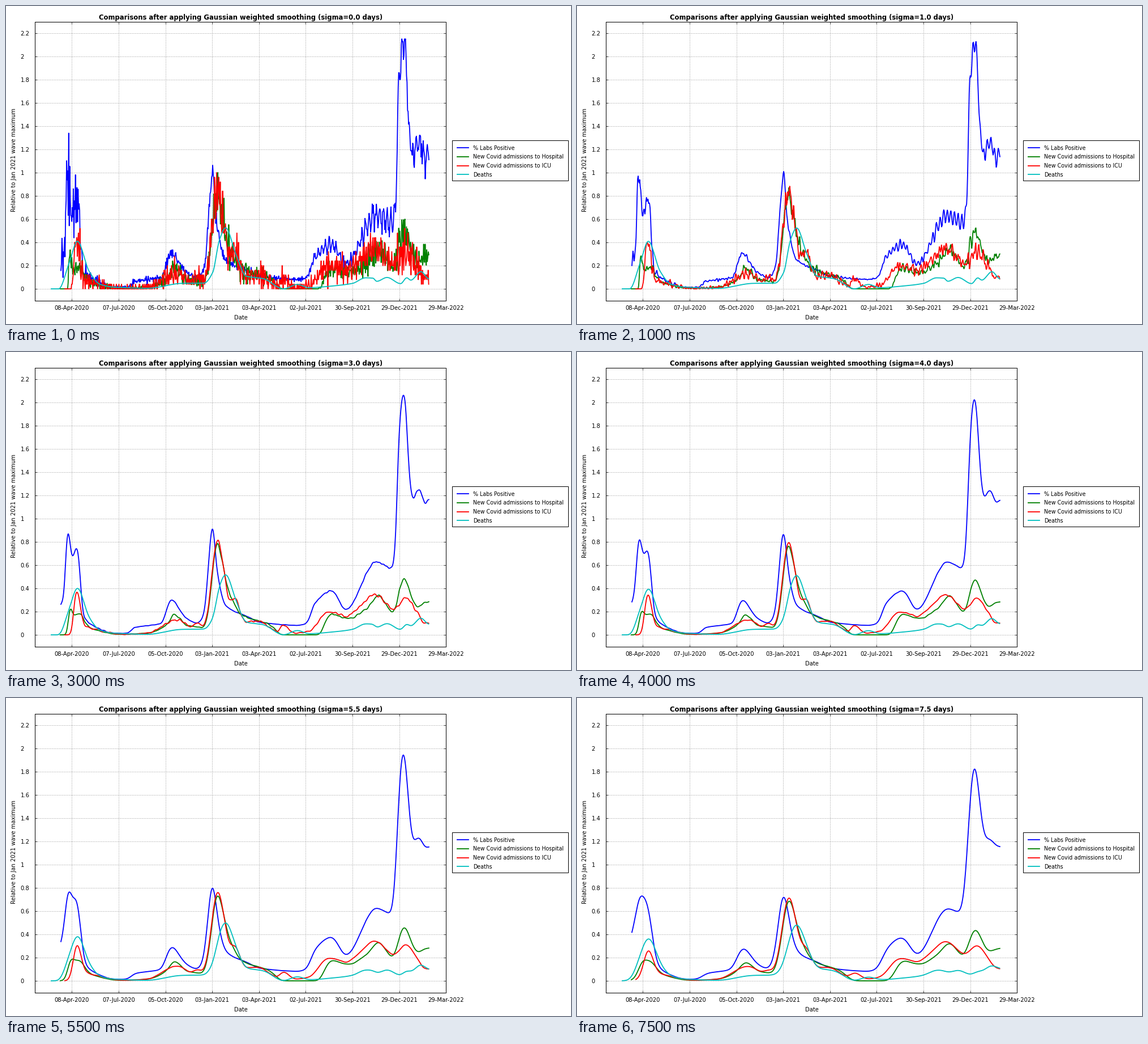
Animation of 998x561 px, one loop 8000 ms. Source, as a matplotlib script:

```python
import numpy as np
import matplotlib.pyplot as plt
from matplotlib.animation import FuncAnimation
from matplotlib.patches import Rectangle

plt.rcParams["font.family"] = "DejaVu Sans"

W, H, DPI = 998, 561, 72  # at 72 dpi one point is one pixel
LEFT, RIGHT, TOP, BOTTOM = 51, 777, 28, 520
ZERO, UNIT = 499, 205.1  # y of value 0, pixels per 1.0
APRIL, DAY = 116.3, 0.918  # x of 8 April 2020, pixels per day
FRAMES, STEP = 16, 0.5

# Turning points of each curve: (stage x, percent of the January 2021 maximum)
LABS = [
    (97, 24), (102, 30), (109, 96), (118, 61), (124, 82), (130, 58),
    (136, 16), (166, 5), (190, 1.5), (215, 1.3), (225, 6), (275, 10),
    (291, 30.5), (318, 14.5), (338, 10), (350, 18), (365, 98), (372, 57),
    (388, 25), (430, 15), (446, 11), (518, 8.2), (532, 10.5), (545, 27),
    (576, 38), (600, 21.5), (654, 63), (682, 57), (688, 72), (694, 180),
    (704, 212), (712, 138), (719, 115), (729, 127), (740, 113), (747, 116),
]
HOSPITAL = [
    (96, 0), (109, 0), (112, 29), (119, 17), (134, 18), (141, 9), (160, 4),
    (200, 0.5), (250, 1.5), (285, 9), (297, 18), (320, 8), (350, 6.5),
    (358, 22), (372, 80), (393, 38), (417, 17), (465, 9), (489, 0),
    (551, 0), (574, 18), (604, 14), (640, 24), (658, 34), (684, 19),
    (702, 49), (726, 24), (747, 29),
]
ICU = [
    (104, 0), (115, 0), (124, 42), (138, 8), (165, 4), (205, 0.5),
    (250, 1.5), (302, 13), (330, 7), (340, 11), (350, 7), (358, 26),
    (373, 84), (396, 29), (404, 32), (422, 11), (445, 12), (480, 3),
    (490, 9), (508, 1.5), (535, 3), (570, 20), (602, 16), (628, 26),
    (652, 35), (685, 22), (707, 32), (728, 18), (742, 9), (747, 11),
]
DEATHS = [
    (80, 0), (93, 0), (112, 23), (126, 41), (147, 15), (166, 4), (190, 1.5),
    (250, 0.5), (310, 4.7), (350, 5), (365, 14), (377, 42), (388, 52.5),
    (406, 30), (424, 11), (455, 8.7), (490, 0), (515, 3.8), (535, 1),
    (575, 2.4), (612, 4.7), (635, 9.5), (648, 9.2), (655, 6.5), (673, 9.8),
    (697, 4.5), (708, 9.5), (715, 7.5), (733, 14.8), (747, 8.7),
]


def daily(points):
    """One value per day on a monotone cubic through the turning points."""
    px, py = np.array(points, float).T
    run = np.diff(px)
    rise = np.diff(py) / run
    a, b = rise[:-1], rise[1:]
    slope = np.zeros(len(px))
    same = a * b > 0
    slope[1:-1][same] = 2 * a[same] * b[same] / (a[same] + b[same])
    x = np.arange(px[0], px[-1] + 0.1, DAY)
    k = np.clip(np.searchsorted(px, x, "right") - 1, 0, len(run) - 1)
    t = np.minimum((x - px[k]) / run[k], 1)
    ease = t * t * (3 - 2 * t)
    bend = t * (1 - t) * (slope[k] * (1 - t) - slope[k + 1] * t)
    return x, py[k] + (py[k + 1] - py[k]) * ease + run[k] * bend


def smooth(values, sigma):
    if sigma == 0:
        return values
    i = np.arange(len(values))
    weight = np.exp(-0.5 * ((i[:, None] - i) / sigma) ** 2)
    return weight @ values / weight.sum(axis=1)


def jitter(n, seed):
    """Day-to-day noise without slow drift."""
    noise = np.random.default_rng(seed).standard_normal(n)
    return noise - smooth(noise, 2.5)


def tally(target, quantum, top):
    """Round to whole counts, carrying the remainder to the next day."""
    out, carry = [], 0.0
    for value in target:
        want = value + carry
        got = min(max(quantum * round(want / quantum), 0), top)
        carry = want - got
        out.append(got)
    return np.array(out)


def labs():
    x, base = daily(LABS)
    weekly = 0.13 * np.minimum(base, 60) * np.cos(
        2 * np.pi * (x - 654) / (7 * DAY))
    spread = 0.45 + 1.9 * np.exp((97 - x) / 60)
    noise = spread * np.sqrt(base) * jitter(len(x), 4)
    return x, tally(base + weekly * (x > 535) + noise, 0.1, 215)


def admissions(points, spread, quantum, seed):
    x, base = daily(points)
    noise = spread * np.sqrt(base) * jitter(len(x), seed)
    return x, tally(base + noise, quantum, 100)


SERIES = [
    ("% Labs Positive", "#0000ff", labs()),
    ("New Covid admissions to Hospital", "#008000",
     admissions(HOSPITAL, 1.2, 0.6, 11)),
    ("New Covid admissions to ICU", "#ff0000", admissions(ICU, 1.7, 4, 23)),
    ("Deaths", "#00bfbf", daily(DEATHS)),
]
DATES = ["08-Apr-2020", "07-Jul-2020", "05-Oct-2020", "03-Jan-2021",
         "03-Apr-2021", "02-Jul-2021", "30-Sep-2021", "29-Dec-2021",
         "29-Mar-2022"]

fig = plt.figure(figsize=((W + 1e-6) / DPI, (H + 1e-6) / DPI), dpi=DPI,
                 facecolor="white")

# Plot area
ax = fig.add_axes([LEFT / W, 1 - BOTTOM / H, (RIGHT - LEFT) / W,
                   (BOTTOM - TOP) / H])
ax.set_xlim(LEFT, RIGHT)
ax.set_ylim((ZERO - BOTTOM) / UNIT, (ZERO - TOP) / UNIT)
date_x = APRIL + 90 * DAY * np.arange(len(DATES))
levels = np.arange(12) * 0.2
ax.set_xticks(np.minimum(date_x, RIGHT))
ax.set_yticks(levels)
ax.tick_params(direction="in", top=True, right=True, length=4, width=0.7,
               labelbottom=False, labelleft=False)
ax.grid(True, color="#8c8c8c", linewidth=1, linestyle=(0, (1, 2)))
ax.set_axisbelow(True)
for spine in ax.spines.values():
    spine.set_linewidth(1)

# Labels and legend in stage pixels
stage = fig.add_axes([0, 0, 1, 1])
stage.set_xlim(0, W)
stage.set_ylim(H, 0)
stage.axis("off")


def label(x, y, text, size=10, ha="center", va="baseline", **kw):
    return stage.text(x, y, text, fontsize=size, ha=ha, va=va, **kw)


title = label(415, 24, "", 11.6, weight="bold")
label(415, 553, "Date")
label(14, 272, "Relative to Jan 2021 wave maximum", rotation=90, va="center")
for x, date in zip(date_x, DATES):
    label(x, 536, date)
for level in levels:
    label(25.5, ZERO - level * UNIT + 4, f"{level:g}", ha="left")

stage.add_patch(Rectangle((788, 237.5), 205, 71, facecolor="white",
                          edgecolor="black", linewidth=1))
lines = []
for i, (name, color, _) in enumerate(SERIES):
    y = 250 + 15.8 * i
    stage.plot([797, 817], [y, y], color=color, lw=1.8)
    label(825, y + 3.5, name, 9.5, ha="left")
    lines += ax.plot([], [], color=color, lw=1.8, solid_joinstyle="round")


def update(k):
    sigma = k * STEP
    title.set_text("Comparisons after applying Gaussian weighted smoothing "
                   f"(sigma={sigma:.1f} days)")
    for line, (_, _, (x, raw)) in zip(lines, SERIES):
        line.set_data(x, smooth(raw, sigma) / 100)
    return [title, *lines]


anim = FuncAnimation(fig, update, frames=FRAMES, interval=500,
                     init_func=lambda: update(0), repeat=True, blit=False)
plt.show()
```
